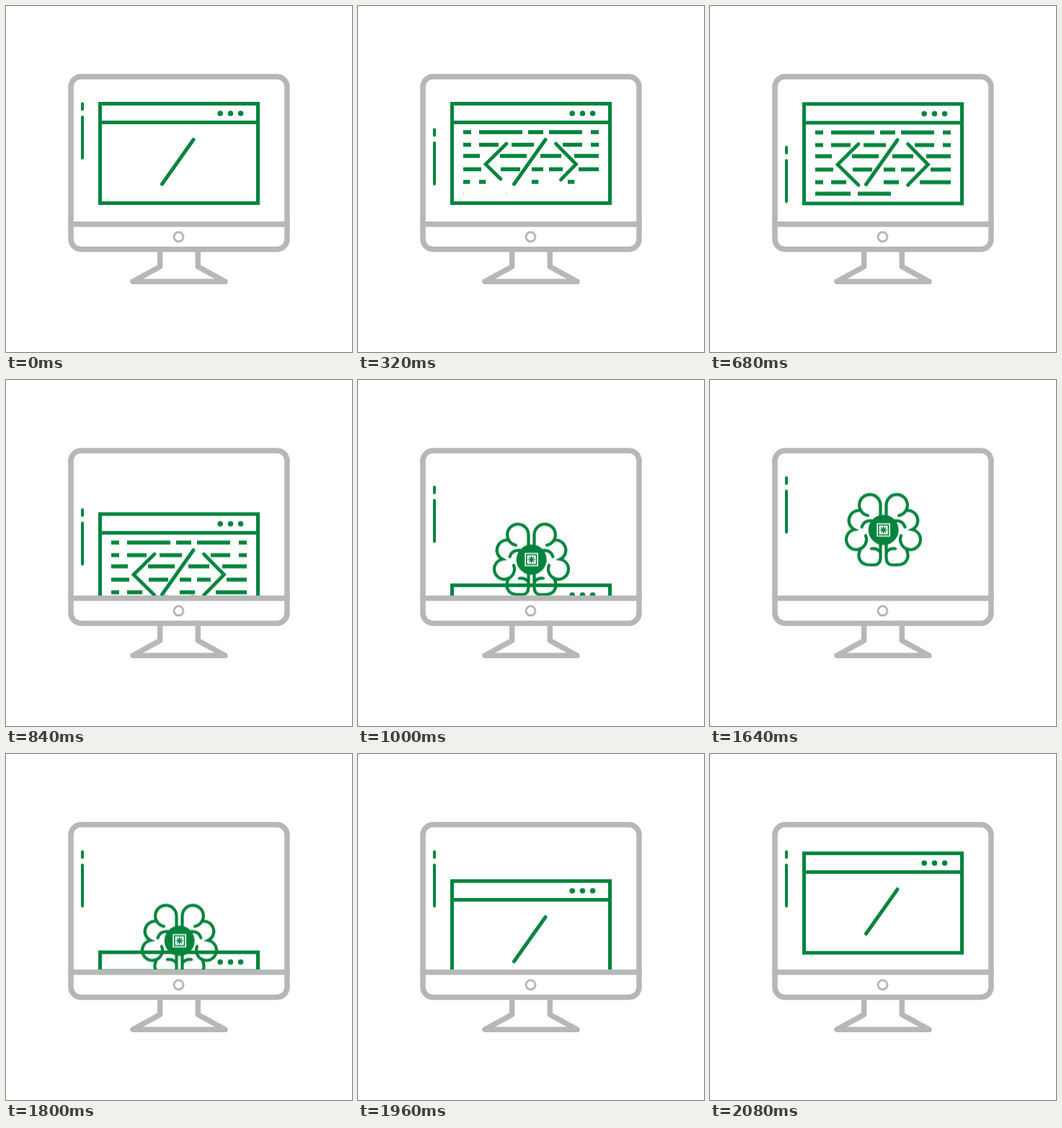
Recreate the animation shown at these times as an HTML page without scripts. Size 480 px wide and 480 px high, loop 2.12 s.

```html
<!DOCTYPE html>
<html lang="en">
<head>
<meta charset="utf-8">
<title>Code to chip</title>
<style>
  html, body { margin: 0; width: 100%; height: 100%; overflow: hidden; background: #fff; }
  svg { display: block; width: 100vw; height: 100vh; }
  .ink { fill: none; stroke: #00843d; }
  .solid { fill: #00843d; stroke: none; }
  .case { fill: none; stroke: #b7b7b7; stroke-width: 7.5; stroke-linecap: round; stroke-linejoin: round; }
  .round { stroke-linecap: round; }

  .scroll, .window, .brain { animation: 2120ms ease-in-out infinite; }
  .scroll { animation-name: scroll; }
  .window { animation-name: window; }
  .brain { animation-name: brain; }
  .code path {
    --len: 62;
    stroke-dasharray: var(--len);
    animation: reveal 2120ms ease-in-out calc(var(--i) * 56ms) infinite both;
  }
  .code .bracket { --len: 84; }

  @keyframes scroll {
    0%, 1.13% { transform: none; }
    26.415%, 31.32% { transform: translateY(60.5px); }
    54.717%, 100% { transform: none; }
  }
  @keyframes window {
    0%, 31.32% { transform: none; }
    54.717%, 76.6% { transform: translateY(190px); }
    100% { transform: none; }
  }
  @keyframes brain {
    0%, 31.32% { transform: translateY(194px); }
    54.717%, 76.6% { transform: none; }
    100% { transform: translateY(194px); }
  }
  /* Resets while the window is out of view. */
  @keyframes reveal {
    0%, 1.4% { stroke-dashoffset: var(--len); }
    13.2%, 60% { stroke-dashoffset: 0; }
    60.01%, 100% { stroke-dashoffset: var(--len); }
  }
</style>
</head>
<body>
<svg viewBox="0 0 480 480">
  <defs>
    <clipPath id="screen"><path d="M90 98H390V299.5H90z"/></clipPath>
    <g id="lobes">
      <path d="M236.5 188V172.5A14.7 14.7 0 1 0 219 187.5"/>
      <path d="M208 180.5A14 14 0 0 0 200.500 207A14 14 0 1 0 216 215.500"/>
      <path d="M210.500 203.500Q214 193 227 195"/>
      <path d="M209 233.500C203 245 208 256 221 256H229Q236.500 255 236.500 246V226"/>
      <path d="M224 233.500Q232 232.500 236 238"/>
    </g>
  </defs>

  <g clip-path="url(#screen)">
    <g class="ink window" stroke-width="5">
      <path d="M130.500 135.500H349.500V273.500H130.500zM130.500 161.500H349.500"/>
      <g class="solid">
        <circle cx="297.200" cy="149" r="3.800"/>
        <circle cx="311.500" cy="149" r="3.800"/>
        <circle cx="325.600" cy="149" r="3.800"/>
      </g>
      <path class="round" d="M260 185.500L216.500 247"/>
      <g class="code" stroke-width="5.600">
        <path style="--i:0" d="M146 175h11m11 0h60m8 0h21m8 0h46m12 0h11"/>
        <path style="--i:1" d="M146 192.500h11m11 0h27m18 0h31m40 0h27m12 0h11"/>
        <path style="--i:2" d="M146 208h23m28 0h37m19 0h29m18 0h34"/>
        <path style="--i:3" d="M146 226.500h25m27 0h27m16 0h16m8 0h19m22 0h28"/>
        <path style="--i:4" d="M146 244h11m11 0h21m52 0h21m29 0h43"/>
        <path style="--i:5" d="M146 260h49m10 0h46"/>
        <g class="round" stroke-width="4.800">
          <path class="bracket" style="--i:2" d="M206 191L177 219.500L206 248"/>
          <path class="bracket" style="--i:2" d="M274.500 191L302.500 219.500L274.500 248"/>
        </g>
      </g>
    </g>

    <g class="brain">
      <g class="ink round" stroke-width="4.200">
        <use href="#lobes"/>
        <use href="#lobes" transform="matrix(-1 0 0 1 481 0)"/>
      </g>
      <circle class="solid" cx="240.700" cy="207.500" r="21"/>
      <g transform="translate(240.700 207.500)">
        <path fill="none" stroke="#fff" stroke-width="1.700" d="M-8.500-8.500H8.500V8.500H-8.500z"/>
        <path fill="#fff" d="M-6-6H6V6H-6z"/>
        <path class="ink" stroke-width="1.600" d="M-5 0H5M0-5V5M-3.500-3.500L3.500 3.500M-3.500 3.500L3.500-3.500"/>
      </g>
    </g>
  </g>

  <path class="ink round scroll" stroke-width="4" d="M106 135.500V143.500M106 154V211"/>

  <g class="case">
    <rect x="90" y="98" width="300" height="239.500" rx="14"/>
    <path d="M90 302.700H390M213.700 337.500V361.500L176 382.300H304L266.300 361.500V337.500"/>
    <circle cx="239.500" cy="320.300" r="6.500" stroke-width="3" style="stroke-width:3"/>
  </g>
</svg>
</body>
</html>
```
